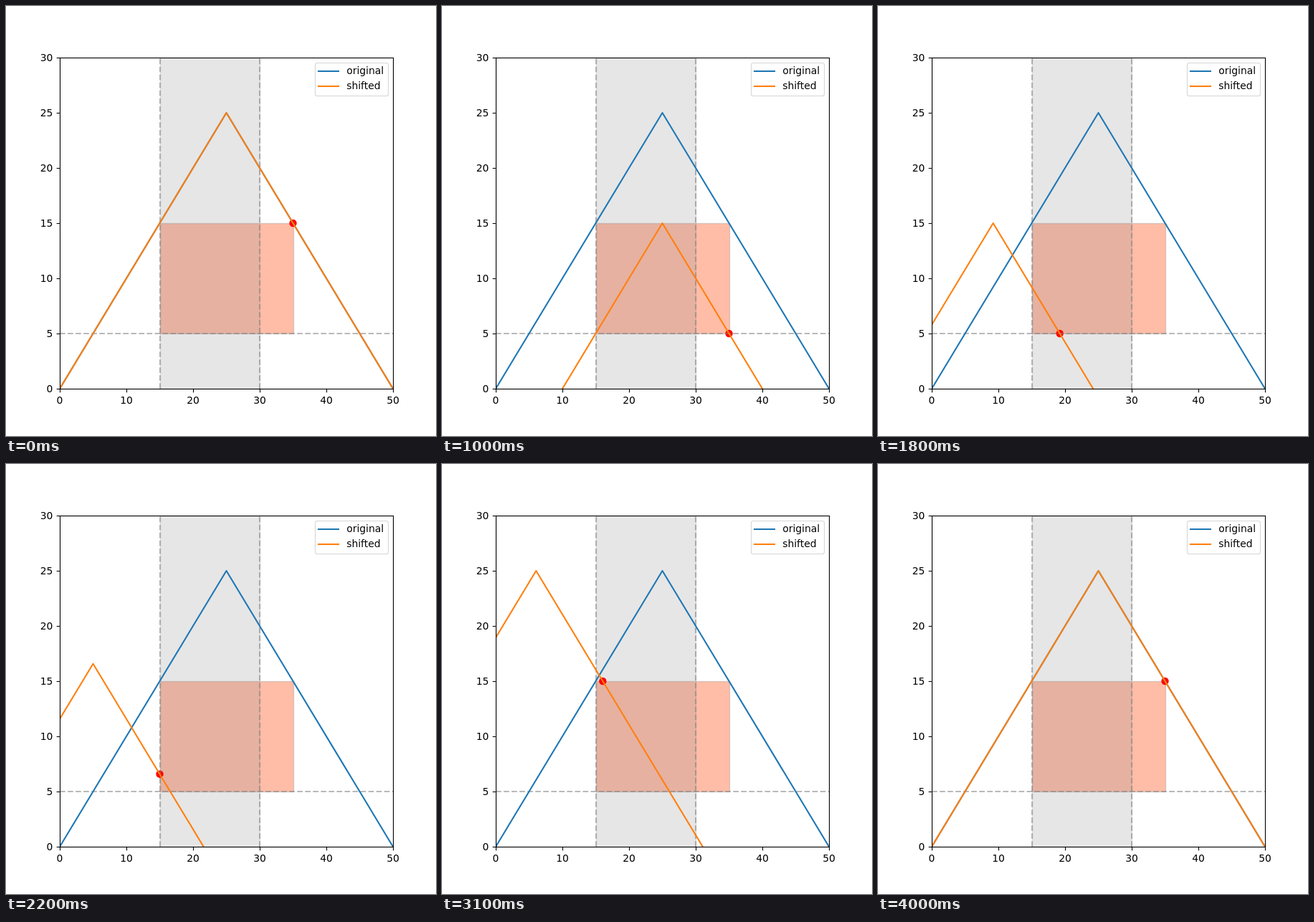
Recreate the animation shown at these times as an HTML page. Size 600 px wide and 600 px high, loop 4050 ms.

```html
<!DOCTYPE html>
<html lang="en">
<head>
<meta charset="utf-8">
<title>Shifted triangle</title>
<style>
  html, body { margin: 0; width: 100%; height: 100%; overflow: hidden; background: #fff; }
  svg { display: block; }
  text { font: 13.89px "DejaVu Sans", sans-serif; }
  .curve { fill: none; stroke-width: 2.083; stroke-linejoin: round; stroke-linecap: square; }
  .blue { stroke: #1f77b4; }
  .orange { stroke: #ff7f0e; }
  .dash { fill: none; stroke: #808080; stroke-opacity: .55; stroke-width: 2.083; stroke-dasharray: 7.708 3.333; }
  .axis { fill: none; stroke: #000; stroke-width: 1.11; }
</style>
</head>
<body>
<svg width="600" height="600" viewBox="0 0 600 600">
  <clipPath id="plot"><rect x="75" y="72" width="465" height="462"/></clipPath>
  <g clip-path="url(#plot)">
    <rect x="215.5" y="303.5" width="186" height="154" fill="#ffbda7" stroke="#808080" stroke-opacity=".3" stroke-width="1.39"/>
    <rect x="215.5" y="72.5" width="139" height="462" fill="#808080" fill-opacity=".2" stroke="#808080" stroke-opacity=".2" stroke-width="1.39"/>
    <circle id="dot" cx="400.5" cy="303" r="5.2" fill="red"/>
    <path class="dash" d="M75 457H540"/>
    <path class="dash" d="M215 534V72"/>
    <path class="dash" d="M354 534V72"/>
    <path class="curve blue" d="M75 534L307.5 149L540 534"/>
    <path id="shifted" class="curve orange" d="M75 534L307.5 149L540 534"/>
  </g>
  <rect class="axis" x="75.5" y="72.5" width="465" height="462"/>
  <g id="ticks"></g>
  <rect x="431.5" y="79.5" width="102" height="46" rx="2.8" fill="#fff" fill-opacity=".8" stroke="#ccc" stroke-opacity=".8" stroke-width="1.11"/>
  <path class="curve blue" d="M436 91H464"/>
  <path class="curve orange" d="M436 112H464"/>
  <text x="475.2" y="95">original</text>
  <text x="475.2" y="116">shifted</text>
</svg>
<script>
  const UNIT_X = 9.3, UNIT_Y = 15.4, STEP = 50, FRAMES = 81, PHASE = 20;
  const byId = id => document.getElementById(id);

  const label = (x, y, anchor, value) =>
    `<text x="${x}" y="${y}" text-anchor="${anchor}">${value}</text>`;
  const tick = d => `<path class="axis" d="${d}"/>`;
  let marks = "";
  for (let v = 0; v <= 50; v += 10) {
    const x = 75 + v * UNIT_X;
    marks += tick(`M${Math.round(x) + .5} 534.5v4.86`) + label(x, 555, "middle", v);
  }
  for (let v = 0; v <= 30; v += 5) {
    const y = 534 - v * UNIT_Y;
    marks += tick(`M75.5 ${Math.round(y) + .5}h-4.86`) + label(65.3, Math.round(y) + 5, "end", v);
  }
  byId("ticks").innerHTML = marks;

  // Phases: down 10, left 20, up 10, right 20; each holds at its ends.
  function offset(frame) {
    const n = Math.max(0, frame - 1);
    const phase = Math.floor(n / PHASE);
    const p = (n % PHASE) / (PHASE - 1);
    return [[0, -10 * p], [-20 * p, -10], [-20, -10 + 10 * p], [-20 + 20 * p, 0]][phase];
  }

  function draw(now) {
    const [dx, dy] = offset(Math.floor(now / STEP) % FRAMES);
    const move = `translate(${dx * UNIT_X} ${-dy * UNIT_Y})`;
    byId("shifted").setAttribute("transform", move);
    byId("dot").setAttribute("transform", move);
    requestAnimationFrame(() => draw(performance.now()));
  }
  draw(performance.now());
</script>
</body>
</html>
```
